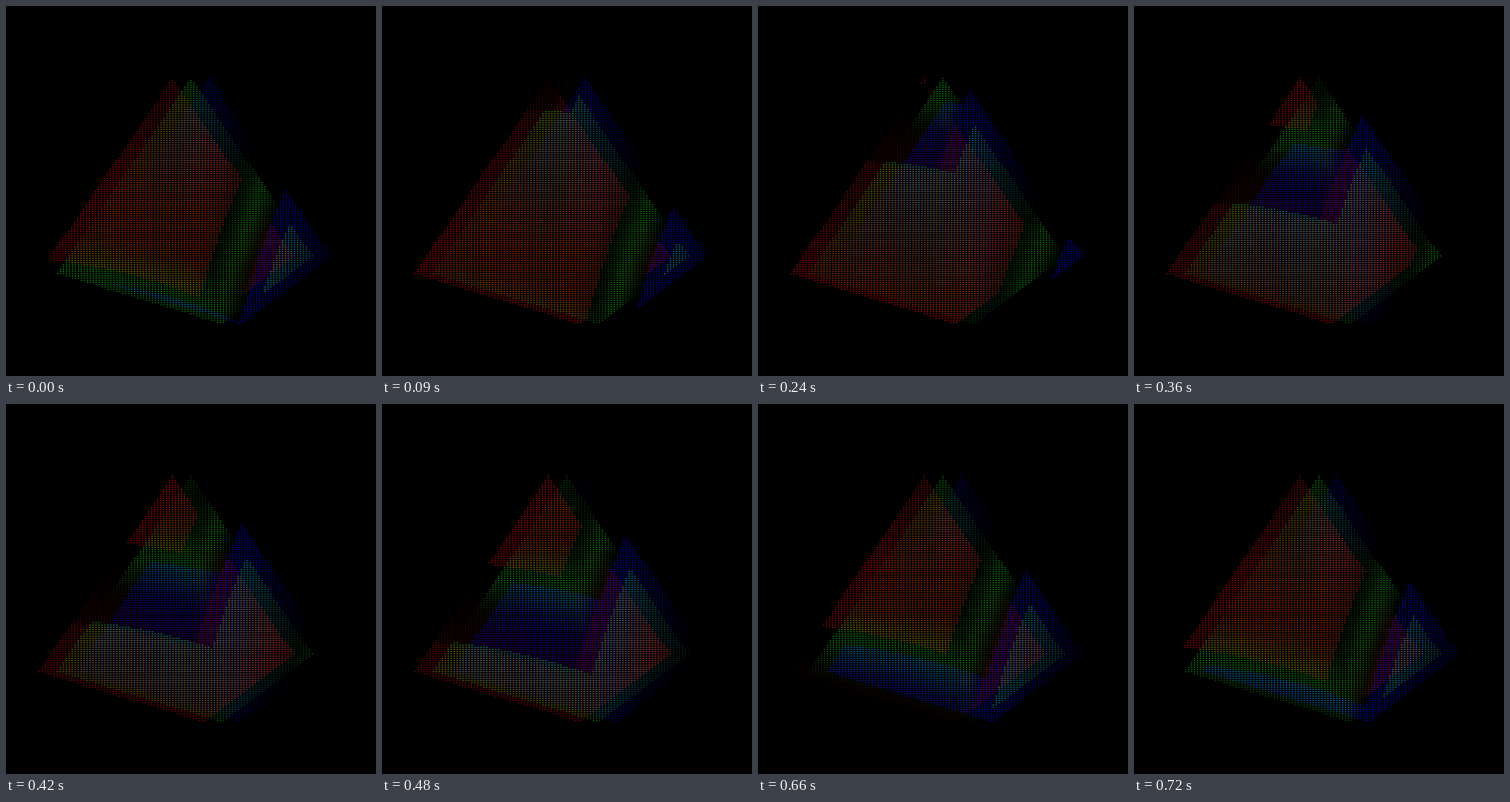
These frames come from a looping animation (500 by 500 pixels, 750 ms). An HTML page with a canvas:

```html
<!DOCTYPE html>
<html lang="en">
<head>
<meta charset="utf-8">
<title>Pyramid</title>
<style>
html, body { margin: 0; width: 100%; height: 100%; overflow: hidden; background: #000; }
canvas { display: block; width: 500px; height: 500px; }
</style>
</head>
<body>
<canvas id="stage" width="500" height="500"></canvas>
<script>
const SIZE = 500, LOOP = 750, STEP = 30, SPLIT = 25;
const CELL_W = 4, CELL_H = 3, SPILL_X = 0.6, SPILL_Y = 0.4;
const ctx = document.getElementById('stage').getContext('2d');
const image = ctx.createImageData(SIZE, SIZE);
const px = image.data;
for (let i = 3; i < px.length; i += 4) px[i] = 255;

// Base corners relative to the apex; delay = time the colour edge needs to get there.
const apex = { x: 249, y: 97 };
const left = { x: -181, y: 264, delay: 565, bend: 0 };
const front = { x: 42, y: 332, delay: 580, bend: 0.12 };
const right = { x: 165, y: 241, delay: 925, bend: 0 };

// Brightness by phase since the edge passed: indigo, green, yellow, red, peach.
const bump = (u, mid, width) => Math.exp(-(((u - mid) / width) ** 2));
const red = u => u < 0.3 ? Math.max(0, 0.22 - u) : 0.5 + 0.25 * bump(u, 0.5, 0.22);
const green = u => 0.52 * bump(u, 0.26, 0.1) + 0.55 * u ** 1.5;
const blue = u => u < 0.23 ? 0.65 + 0.5 * u : Math.max(0, 1.2 * (u - 0.5));
const channels = [red, green, blue];

const travel = (c, s) => s * c.delay * (1 + c.bend * (1 - s));

// Delay at a point on the face between two corners, or null outside it.
function faceDelay(p, q, x, y) {
  const det = p.x * q.y - p.y * q.x;
  const a = (x * q.y - y * q.x) / det;
  const b = (p.x * y - p.y * x) / det;
  return a >= 0 && b >= 0 && a + b <= 1 ? travel(p, a) + travel(q, b) : null;
}

const dots = [];
for (let y = 1; y < SIZE; y += CELL_H) {
  for (let cx = 0; cx < SIZE; cx += CELL_W) {
    for (let ch = 0; ch < 3; ch++) {
      const x = cx + ch;
      const dx = x - apex.x - (ch - 1) * SPLIT, dy = y - apex.y;
      const delay = faceDelay(left, front, dx, dy) ?? faceDelay(front, right, dx, dy);
      if (delay !== null) dots.push({ at: (y * SIZE + x) * 4 + ch, ch, delay });
    }
  }
}

function draw(now) {
  const t = Math.floor(now % LOOP / STEP) * STEP;
  for (const { at, ch, delay } of dots) {
    const u = ((t - delay) / LOOP % 1 + 1) % 1;
    const v = 255 * channels[ch](u);
    const below = at + SIZE * 4;
    px[at] = v;
    px[at + 4] = v * SPILL_X;
    px[below] = v * SPILL_Y;
    px[below + 4] = v * SPILL_X * SPILL_Y;
  }
  ctx.putImageData(image, 0, 0);
}

const start = performance.now();
function tick() {
  draw(performance.now() - start);
  requestAnimationFrame(tick);
}
tick();
</script>
</body>
</html>
```
